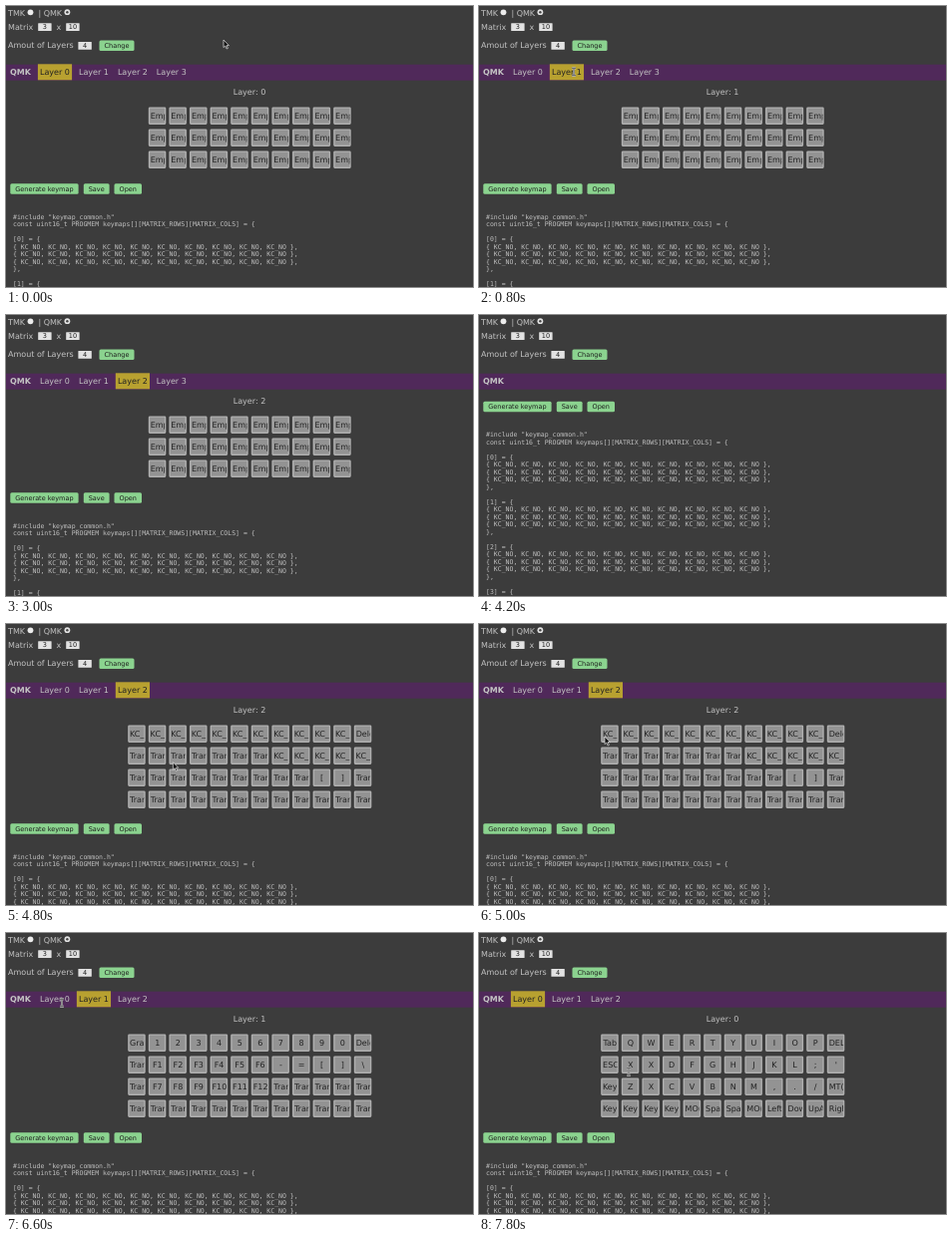
An HTML page for the animation above (8 s loop, 468 by 282 pixels).

```html
<!DOCTYPE html>
<html lang="en">
<head>
<meta charset="utf-8">
<title>Keymap editor</title>
<style>
  html, body { margin: 0; width: 100%; height: 100%; overflow: hidden; background: #3c3c3c; }
  svg { display: block; }
  text { font: 8px "DejaVu Sans", sans-serif; fill: #c4c4c4; text-rendering: geometricPrecision; white-space: pre; }
  .bold { font-weight: bold; }
  .dark { fill: #222; }
  .small { font-size: 6.5px; fill: #1c1c1c; }
  .code { font: 6.5px "DejaVu Sans Mono", monospace; fill: #c0c0c0; }
</style>
</head>
<body>
<svg id="stage" width="468" height="282" viewBox="0 0 468 282"></svg>
<script>
const LOOP = 8000, STEP = 200;
const NS = "http://www.w3.org/2000/svg";
const stage = document.getElementById("stage");

function add(parent, tag, attrs, text) {
  const el = document.createElementNS(NS, tag);
  for (const name in attrs) el.setAttribute(name, attrs[name]);
  if (text !== undefined) el.textContent = text;
  parent.appendChild(el);
  return el;
}
const box = (parent, x, y, width, height, fill, rx = 0) =>
  add(parent, "rect", { x, y, width, height, fill, rx });
const label = (parent, x, y, text, cls = "", anchor = "start") =>
  add(parent, "text", { x, y, class: cls, "text-anchor": anchor }, text);

function button(parent, x, y, w, text) {
  box(parent, x, y - 5.3, w, 10.6, "#8bd38f", 1.5);
  label(parent, x + w / 2, y + 2.3, text, "small", "middle");
}
function field(parent, x, y, text) {
  box(parent, x, y - 3.8, 13.4, 7.7, "#e2e2e2", 0.5);
  label(parent, x + 6.7, y + 2.4, text, "small", "middle");
}

// Key legends
const row = (text) => text.split(" ");
const fill = (n, text) => Array(n).fill(text);
const trans = (n) => fill(n, "Trans");
const blank = fill(3, fill(10, "Empty"));
const loaded = [
  [
    row("Tab Q W E R T Y U I O P DEL"),
    row("ESC X X D F G H J K L ; '"),
    row("Key Z X C V B N M , . / MT(x)"),
    row("Key Key Key Key MO(1) Space Space MO(2) LeftA DownA UpArr Right"),
  ],
  [
    row("Grave 1 2 3 4 5 6 7 8 9 0 Delete"),
    row("Trans F1 F2 F3 F4 F5 F6 - = [ ] \\"),
    [...trans(1), ...row("F7 F8 F9 F10 F11 F12"), ...trans(5)],
    trans(12),
  ],
  [
    [...fill(11, "KC_"), "Delete"],
    [...trans(7), ...fill(5, "KC_")],
    [...trans(9), "[", "]", ...trans(1)],
    trans(12),
  ],
];

// Page states: start time, number of tabs, active layer, key grid
const states = [
  { at: 0, tabs: 4, layer: 0, keys: blank },
  { at: 800, tabs: 4, layer: 1, keys: blank },
  { at: 1400, tabs: 4, layer: 2, keys: blank },
  { at: 4200, tabs: 0, layer: -1, keys: [] },
  { at: 4400, tabs: 3, layer: 2, keys: loaded[2] },
  { at: 5800, tabs: 3, layer: 1, keys: loaded[1] },
  { at: 6800, tabs: 3, layer: 0, keys: loaded[0] },
];

// Pointer path: time, x, y, shape from that time on
const path = [
  [0, 218, 34, "arrow"],
  [800, 95, 66, "beam"],
  [1000, 92, 68, "beam"],
  [1400, 128, 68, "beam"],
  [1600, 134, 155, "arrow"],
  [2200, 126, 180, "arrow"],
  [2800, 122, 182, "arrow"],
  [3000, 122, 182, "none"],
  [4400, 250, 190, "arrow"],
  [5000, 126, 113, "arrow"],
  [5800, 92, 66, "beam"],
  [6200, 86, 68, "beam"],
  [6600, 56, 70, "beam"],
  [6800, 57, 70, "beam"],
  [7000, 70, 84, "arrow"],
  [7400, 136, 128, "arrow"],
  [7600, 147, 136, "beam"],
  [7800, 150, 139, "beam"],
];

function drawHeader() {
  const g = add(stage, "g");
  label(g, 2, 9.8, "TMK");
  add(g, "circle", { cx: 24.5, cy: 6.3, r: 2.9, fill: "#ececec" });
  label(g, 32.4, 9.8, "| QMK");
  add(g, "circle", { cx: 61.4, cy: 6.2, r: 2.9, fill: "#e4e4e4" });
  add(g, "circle", { cx: 61.4, cy: 6.2, r: 1.2, fill: "#444" });
  label(g, 2, 23.6, "Matrix");
  field(g, 32.2, 21, "3");
  label(g, 50.6, 23.6, "x");
  field(g, 60.2, 21, "10");
  label(g, 2, 42.4, "Amout of Layers");
  field(g, 72.4, 39.9, "4");
  button(g, 93.5, 39.8, 35, "Change");
  box(g, 0, 58.7, 468, 16, "#50295a");
  label(g, 4, 69, "QMK", "bold");
}

function drawKey(parent, x, y, text) {
  add(parent, "rect", { x: x + 1.1, y: y + 1.1, width: 16.1, height: 16.1, rx: 0.6,
    fill: "#939393", stroke: "#b0b0b0", "stroke-width": 1.4 });
  const inner = 14.6;
  const view = add(parent, "svg", { x: x + 2.1, y, width: inner, height: 18, overflow: "hidden" });
  const el = label(view, 0.2, 11.8, text, "dark");
  const spare = inner - el.getComputedTextLength();
  if (spare > 0) el.setAttribute("x", spare / 2);
}

function drawCode(parent, y) {
  const keys = "{ " + fill(10, "KC_NO").join(", ") + " },";
  const lines = ['#include "keymap_common.h"',
    "const uint16_t PROGMEM keymaps[][MATRIX_ROWS][MATRIX_COLS] = {", ""];
  for (let i = 0; i < 4; i++) lines.push(`[${i}] = {`, keys, keys, keys, "},", "");
  lines.forEach((line, i) => label(parent, 7, y + i * 7.5, line, "code"));
}

function drawState(g, { tabs, layer, keys }) {
  g.replaceChildren();
  for (let i = 0; i < tabs; i++) {
    const x = 31.9 + i * 38.95, active = i === layer;
    if (active) box(g, x, 58.3, 34.2, 16, "#b8a130");
    label(g, x + 2.1, 69, "Layer " + i, active ? "dark" : "");
  }
  if (layer >= 0) label(g, 244, 89.2, "Layer: " + layer, "", "middle");
  const pitch = 20.6;
  keys.forEach((line, r) => {
    const left = 244.1 - (line.length * pitch - 2.6) / 2;
    line.forEach((text, c) => drawKey(g, left + c * pitch, 101 + r * 22, text));
  });
  const y = keys.length ? 117.5 + keys.length * 22 : 92;
  button(g, 4.3, y, 68.3, "Generate keymap");
  button(g, 77.8, y, 25.8, "Save");
  button(g, 108.5, y, 27.5, "Open");
  drawCode(g, y + 30.2);
}

drawHeader();
const page = add(stage, "g");
const pointer = add(stage, "g");
const shapes = {
  arrow: add(pointer, "path", { d: "M0 0V7.6L1.8 6L3.1 9L4.4 8.4L3.1 5.6H5.4Z",
    fill: "#111", stroke: "#e8e8e8", "stroke-width": 0.7 }),
  beam: add(pointer, "g"),
};
const beamPath = "M-2 -3.8H-0.6L0 -3.3L0.6 -3.8H2M0 -3.3V3.3M-2 3.8H-0.6L0 3.3L0.6 3.8H2";
for (const [stroke, width] of [["#e8e8e8", 1.9], ["#111", 0.8]])
  add(shapes.beam, "path", { d: beamPath, fill: "none", stroke, "stroke-width": width });

function movePointer(t) {
  const i = path.findLastIndex((p) => p[0] <= t);
  const [t0, x0, y0, shape] = path[i];
  const [t1, x1, y1] = path[i + 1] || [LOOP, x0, y0];
  const k = (t - t0) / (t1 - t0);
  pointer.setAttribute("transform", `translate(${x0 + (x1 - x0) * k} ${y0 + (y1 - y0) * k})`);
  for (const name in shapes) shapes[name].setAttribute("display", name === shape ? "inline" : "none");
}

let current = null;
function render(time) {
  const t = Math.floor((time % LOOP) / STEP) * STEP;
  const state = states.findLast((s) => s.at <= t);
  if (state !== current) drawState(page, current = state);
  movePointer(t);
}

function tick() {
  render(performance.now());
  requestAnimationFrame(tick);
}
tick();
</script>
</body>
</html>
```
